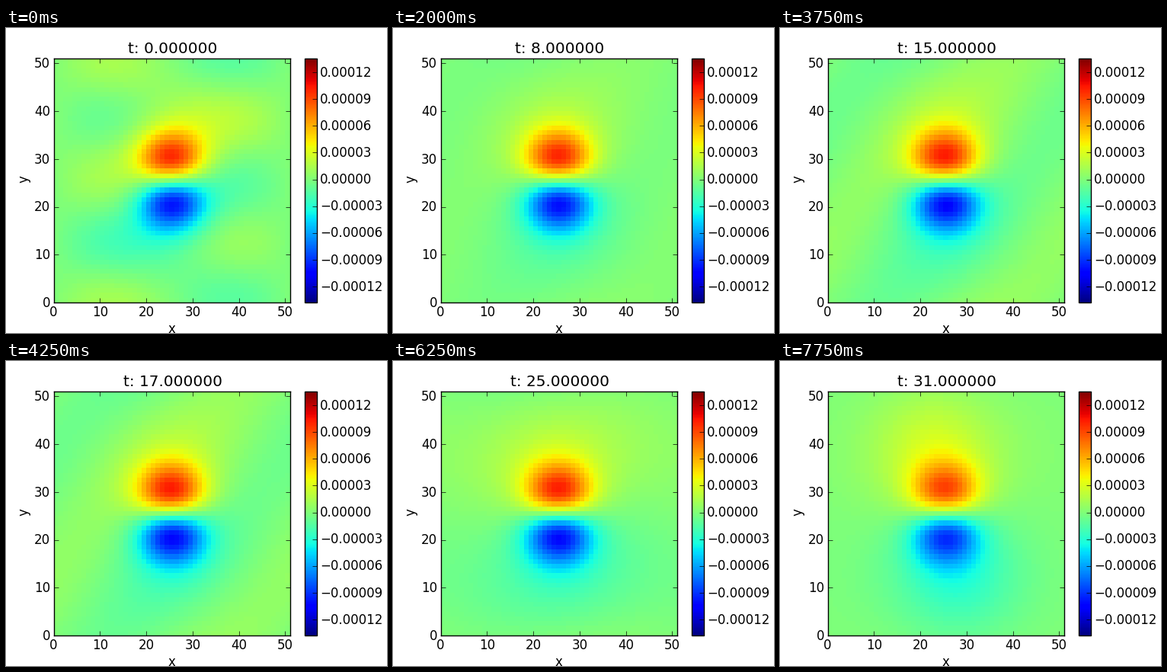
Recreate the animation shown at these times as a matplotlib script. Size 500x400 px, loop 8000 ms.

```python
import numpy as np
import matplotlib.pyplot as plt
from matplotlib.animation import FuncAnimation
from matplotlib.transforms import Affine2D

plt.style.use("classic")
plt.rcParams["font.family"] = "DejaVu Sans"

N = 51          # cells per side
FRAMES = 32
UNIT = 1e-4
K = 2 * np.pi / N

axis = np.arange(N) - N // 2
X, Y = np.meshgrid(axis, axis)
R2 = X**2 + Y**2


def bump(x, y, radius):
    return np.exp(-((X - x)**2 + (Y - y)**2) / (2 * radius**2))


# All parts change sign under a half turn about the centre.
VORTEX = Y / 5 * np.exp(0.5 - R2 / 50)
HALO = 20 * Y / (R2 + 100) * np.cos(K * Y / 2) * np.exp(-X**2 / 600)
CORNERS = -np.sin(K * X) * np.cos(2 * K * Y)
DIAGONAL = -np.sin(K * (X - Y))
BROAD = np.sin(K * Y)
BULGE = bump(-3, 14, 9) - bump(3, -14, 9)


def pulse(t, peak, width):
    return np.exp(-((t - peak) / width)**2)


def field(t):
    swell = pulse(t, 31, 4)
    return UNIT * ((0.83 - 0.12 * swell) * VORTEX
                   + (0.20 - 0.05 * swell) * HALO
                   + 0.13 * pulse(t, 0, 2.5) * CORNERS
                   + 0.08 * pulse(t, 15.5, 8) * DIAGONAL
                   + 0.06 * pulse(t, 25.5, 3.5) * BROAD
                   + 0.20 * swell * BULGE)


fig = plt.figure(figsize=(5, 4), dpi=100, facecolor="white")
ax = fig.add_axes([0.125, 0.1, 0.62, 0.8])
cax = fig.add_axes([0.784, 0.1, 0.032, 0.8])

edges = np.arange(N + 1)
mesh = ax.pcolormesh(edges, edges, field(0), cmap="jet",
                     vmin=-1.38 * UNIT, vmax=1.355 * UNIT)
ax.set(xlim=(0, N), ylim=(0, N),
       xticks=range(0, N, 10), yticks=range(0, N, 10))
ax.tick_params(axis="x", pad=2.6)
ax.tick_params(axis="y", pad=3.3)
ax.set_xlabel("x", labelpad=3.5)
ax.set_ylabel("y", labelpad=2.8, y=0.506)
title = ax.set_title("t: 0.000000", x=0.505)

levels = np.arange(-4, 5) * 3e-5
bar = fig.colorbar(mesh, cax=cax, ticks=levels)
cax.set_yticklabels([f"{v:.5f}".replace("-", "\u2212") for v in levels])
cax.tick_params(axis="y", pad=2.8)

# Centre the digits on their ticks.
for label in [*ax.get_yticklabels(), *cax.get_yticklabels()]:
    label.set_transform(label.get_transform() + Affine2D().translate(0, -0.75))


def update(t):
    mesh.set_array(field(t))
    title.set_text(f"t: {t:f}")
    return mesh, title


anim = FuncAnimation(fig, update, frames=FRAMES, interval=250,
                     repeat=True, repeat_delay=0, blit=False)
plt.show()
```
